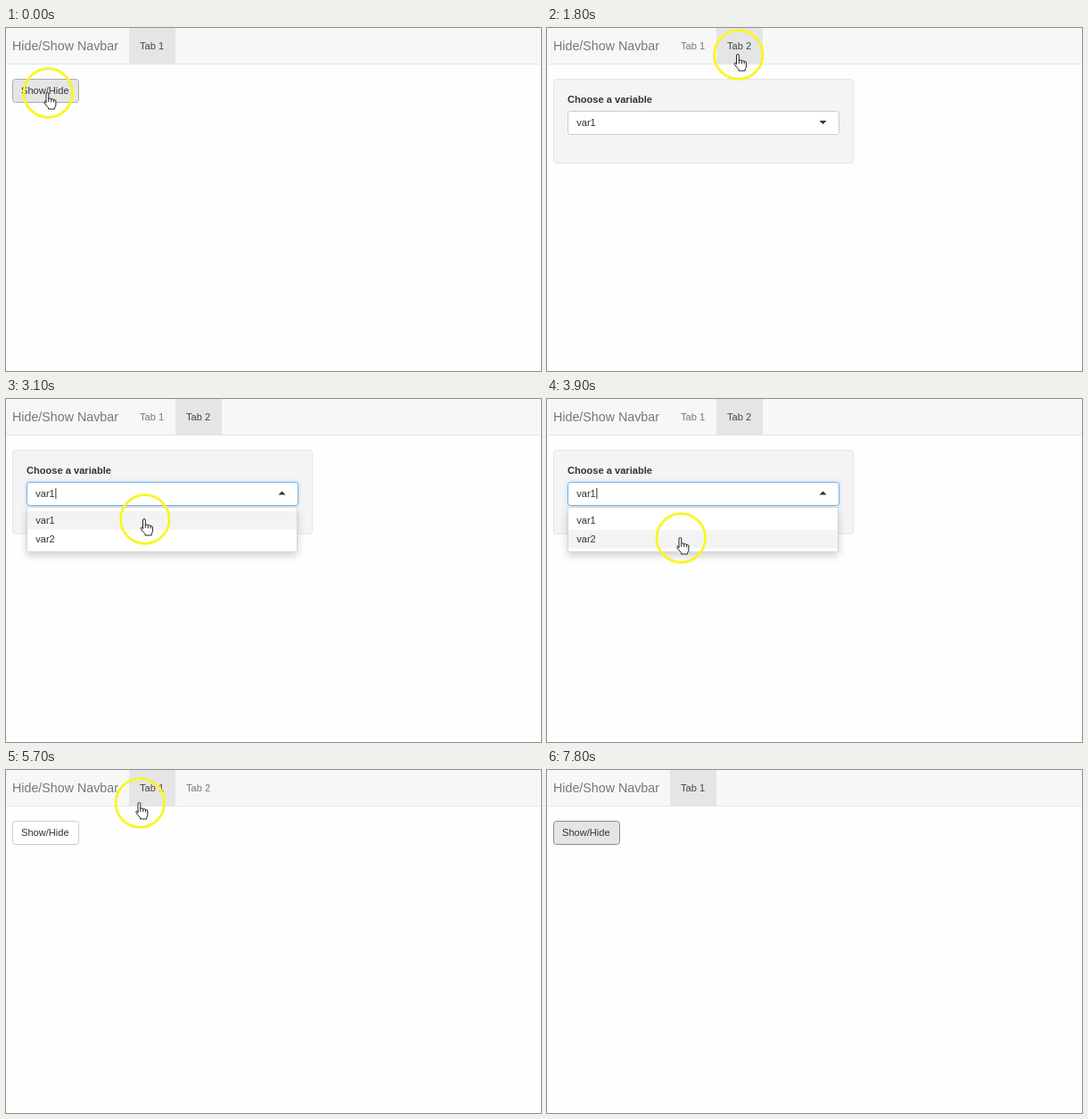
Animation, 600 px wide and 385 px high, one loop 9 s. Source, as an HTML page:

```html
<!DOCTYPE html>
<html lang="en">
<head>
<meta charset="utf-8">
<title>Hide/Show Navbar</title>
<style>
  html, body { margin: 0; width: 100%; height: 100%; overflow: hidden; background: #fefefe; }
  svg { display: block; width: 600px; height: 385px; font: 11.1px "Liberation Sans", Arial, sans-serif; fill: #333; }
  .brand { font-size: 14.28px; fill: #777; }
  .label { font-weight: bold; }
  .well { fill: #f4f3f5; stroke: #e5e4e6; }
  .field { fill: #fff; stroke: #ccc; }
  .field.focus { stroke: #6fb3ea; filter: drop-shadow(0 0 2px rgba(102, 175, 233, .45)); }
  .list { fill: #fff; stroke: #d4d4d4; filter: drop-shadow(0 4px 4px rgba(0, 0, 0, .18)); }
  .ring { fill: none; stroke: #f9f620; stroke-width: 2.8; }
  .hand { fill: #fff; stroke: #222; stroke-width: 1; stroke-linejoin: round; stroke-linecap: round; }
</style>
</head>
<body>
<svg viewBox="0 0 600 385">
  <rect width="600" height="40" fill="#f8f7f8"/>
  <rect y="40" width="600" height="1" fill="#e5e5e5"/>
  <text class="brand" x="7" y="25">Hide/Show Navbar</text>
  <rect id="tabBack" x="138" width="52" height="40.5" fill="#e6e5e6"/>
  <text id="tab1" x="150" y="24.2">Tab 1</text>
  <text id="tab2" x="202" y="24.2">Tab 2</text>

  <g id="page1">
    <rect id="button" x="7.5" y="57.5" width="74" height="26" rx="3"/>
    <text x="17" y="74.2">Show/Hide</text>
  </g>

  <g id="page2">
    <rect class="well" x="7.5" y="57.5" width="336" height="94" rx="3"/>
    <text class="label" x="23" y="84.3">Choose a variable</text>
    <rect id="field" class="field" x="23.5" y="93.5" width="304" height="26" rx="3"/>
    <text id="value" x="33.2" y="109.8"></text>
    <path id="caret"/>
    <g id="menu">
      <path d="M55.9 100v12" stroke="#333"/>
      <rect class="list" x="23.5" y="121.5" width="303" height="50" rx="2"/>
      <rect id="option" x="24" width="302" height="20.5" fill="#f4f3f4"/>
      <text x="33.2" y="139.9">var1</text>
      <text x="33.2" y="160.7">var2</text>
    </g>
  </g>

  <g id="pointer">
    <circle class="ring" r="27.3"/>
    <path class="hand" d="M-2.3 10.5V1Q-2.3-.5-.9-.5T.5 1V6.6Q.8 5.8 2.1 5.9T3.5 7.2Q3.9 6.5 5 6.6T6.3 8Q6.7 7.4 7.6 7.6T8.6 9V13Q8.6 15 7.4 16.3V18H.2V16.5Q-2.4 14-4.4 10.8Q-4.8 9.5-3.8 9.1T-2.3 10.5Z"/>
    <path class="hand" d="M.5 6.6V9.6M3.5 7.2V9.8M6.3 8V10"/>
  </g>
</svg>
<script>
  const LOOP = 9000, STEP = 100, GLIDE = 1000;
  const SWITCH = 1700, OPEN = 2700, PICK = 4000, BACK = 5500, HIDE = 7000, LEFT = 7800;
  const $ = id => document.getElementById(id);
  const show = (id, on) => $(id).style.display = on ? "" : "none";
  const within = (t, a, b) => t >= a && t < b;

  // when the pointer sets off, and where it comes to rest
  const stops = [
    [200, 45, 74.5],
    [900, 215, 30],
    [1900, 161, 115],
    [2900, 150.3, 156],
    [3900, 187, 41],
    [4900, 150, 37],
    [5900, 64, 71],
    [7300, 137, -30]
  ];

  function place(t) {
    let x = 47.3, y = 73;
    for (const [start, toX, toY] of stops) {
      const p = Math.min(1, Math.max(0, (t - start) / GLIDE));
      const e = 1 - (1 - p) ** 3;
      x += (toX - x) * e;
      y += (toY - y) * e;
    }
    return [x, y];
  }

  function draw(t) {
    const [x, y] = place(t);
    const second = within(t, SWITCH, BACK);
    const open = within(t, OPEN, PICK);

    $("pointer").setAttribute("transform", `translate(${x.toFixed(1)} ${y.toFixed(1)})`);
    show("pointer", t < LEFT);

    $("tabBack").setAttribute("x", second ? 190 : 138);
    const overTab2 = y < 40 && within(x, 190, 242);
    $("tab1").style.fill = second ? "#777" : "#444";
    $("tab2").style.fill = second || overTab2 ? "#444" : "#777";
    show("tab2", within(t, 300, HIDE));

    show("page1", !second);
    show("page2", second);

    const over = x < 82 && within(y, 57, 84) && t < LEFT;
    const focus = t < SWITCH || t >= HIDE;
    $("button").style.fill = over || focus ? "#e6e5e6" : "#fff";
    $("button").style.stroke = over ? "#adadad" : focus ? "#8c8c8c" : "#ccc";

    $("field").classList.toggle("focus", t >= OPEN);
    $("value").textContent = t < PICK ? "var1" : "var2";
    $("caret").setAttribute("d", open ? "M305.5 107.5h8l-4-4z" : "M305.5 104h8l-4 4z");
    show("menu", open);
    $("option").setAttribute("y", y < 147 ? 126 : 147);
  }

  function tick(now) {
    draw(Math.floor(now % LOOP / STEP) * STEP);
    requestAnimationFrame(tick);
  }
  draw(0);
  requestAnimationFrame(tick);
</script>
</body>
</html>
```
